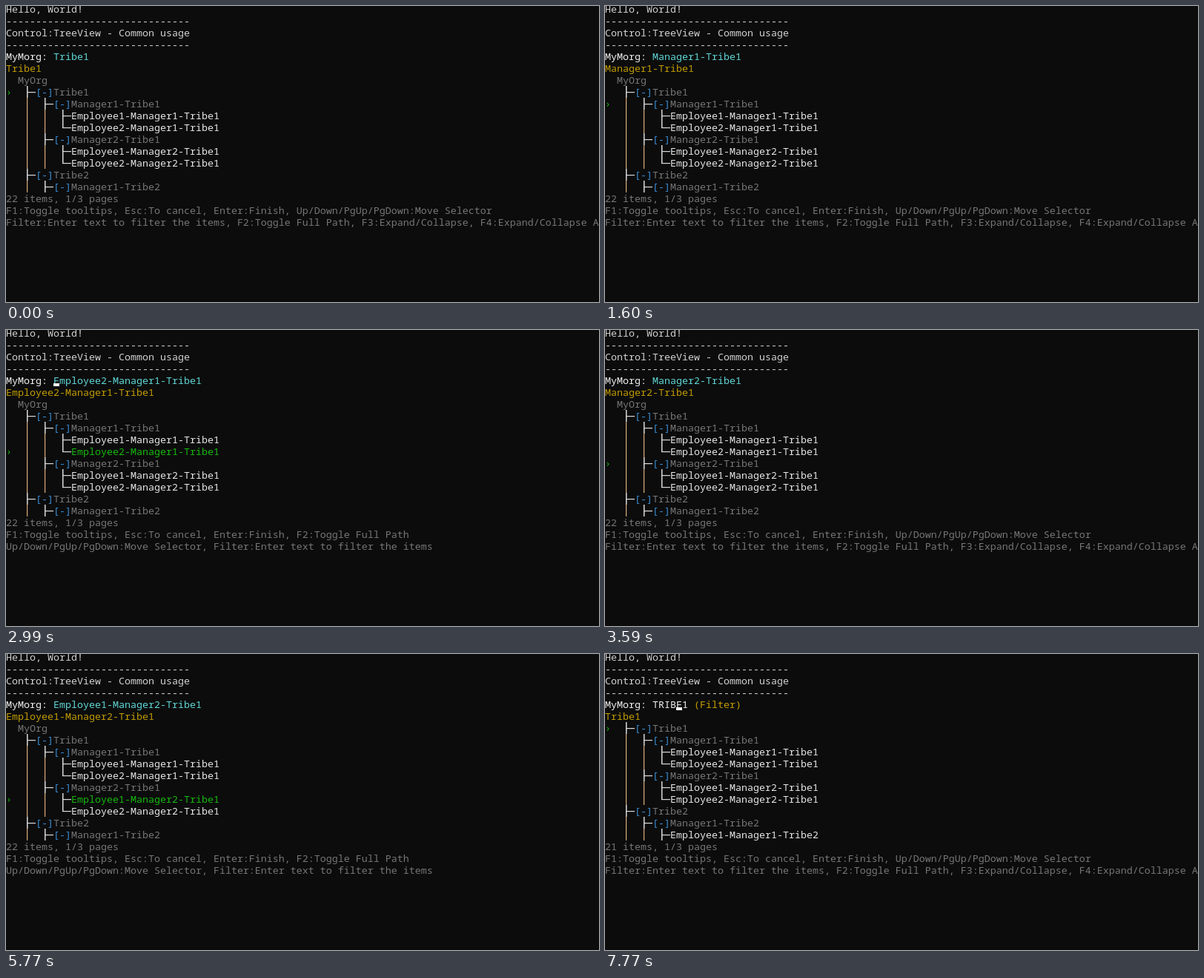
An HTML page for the animation above (8 s loop, 800x400 px).

```html
<!DOCTYPE html>
<html lang="en">
<head>
<meta charset="utf-8">
<title>TreeView</title>
<style>
  html, body { margin: 0; width: 100%; height: 100%; overflow: hidden; background: #0c0c0c; }
  svg { display: block; width: 800px; height: 400px; }
  text { font: 13.333px "Noto Sans Mono", "DejaVu Sans Mono", monospace; white-space: pre; }
</style>
</head>
<body>
<svg viewBox="0 0 800 400">
  <g id="screen"></g>
  <rect id="caret" y="72" width="8" height="4" fill="#f2f2f2"/>
  <path id="mouse" d="M0 0V16.5L3.8 13L6.3 18.6L8.9 17.4L6.5 12H11.6Z" fill="#fff" stroke="#000" stroke-width=".8"/>
</svg>
<script>
const LOOP = 8000, CELL = 8, ROW = 16, PAGE = 10, LIST_ROW = 6;
const C = {
  text: '#d2d2d2', bright: '#f2f2f2', leaf: '#e6e6e6', grey: '#767676', cyan: '#61d6d6',
  yellow: '#c19c00', green: '#16b80e', blue: '#3a8fd6', line: '#d8d8d8', stem: '#d9ac7c'
};

// Each step: start time, selected item, caret visible, filter text
const STEPS = [
  [0, 1, 0], [200, 1, 1], [790, 1, 0],
  [1010, 2, 1], [1600, 2, 0],
  [2000, 3, 1], [2590, 3, 0],
  [2790, 4, 1],
  [3190, 5, 1], [3590, 5, 0], [4180, 5, 1], [4780, 5, 0],
  [5180, 6, 1], [5770, 6, 0], [6170, 6, 1],
  [6370, 7, 1],
  [6760, 1, 1, 'TRIBE1'], [7370, 1, 0, 'TRIBE1'], [7770, 1, 1, 'TRIBE1']
];
const MOUSE = [[0], [400, 351, 184], [590, 367, 158], [1010]];

const HELP = 'F1:Toggle tooltips, Esc:To cancel, Enter:Finish, ';
const MOVE = 'Up/Down/PgUp/PgDown:Move Selector';
const FILTER = 'Filter:Enter text to filter the items';
const PATH = 'F2:Toggle Full Path';

const items = [{ name: 'MyOrg', depth: -1 }];
for (let t = 1; t <= 3; t++) {
  items.push({ name: `Tribe${t}`, depth: 0 });
  for (let m = 1; m <= 2; m++) {
    const manager = `Manager${m}-Tribe${t}`;
    items.push({ name: manager, depth: 1 });
    for (let e = 1; e <= 2; e++)
      items.push({ name: `Employee${e}-${manager}`, depth: 2, last: e === 2 });
  }
}

const put = (col, row, str, color) =>
  `<text x="${col * CELL}" y="${row * ROW + 9}" fill="${color}">${str}</text>`;
const box = (x, y, w, h, color) =>
  `<rect x="${x}" y="${y}" width="${w}" height="${h}" fill="${color}"/>`;

function branch(item, row) {
  const top = row * ROW - 4;
  let out = '';
  for (let d = 0; d < item.depth; d++)
    out += box((3 + 3 * d) * CELL + 4, top, 1.2, ROW, C.stem);
  const x = (3 + 3 * item.depth) * CELL + 4;
  return out + box(x, top, 1.5, item.last ? 9 : ROW, C.line) + box(x, top + 8, 12, 1.2, C.line);
}

function node(item, row, selected) {
  const arrow = selected ? put(0, row, '›', C.green) : '';
  if (item.depth < 0) return arrow + put(2, row, item.name, C.grey);
  const col = 5 + 3 * item.depth, leaf = item.depth === 2;
  const label = leaf
    ? put(col, row, item.name, selected ? C.green : C.leaf)
    : put(col, row, '[-]', C.blue) + put(col + 3, row, item.name, C.grey);
  return arrow + branch(item, row) + label;
}

function draw(sel, filter) {
  const current = items[sel], rule = '-'.repeat(31);
  const first = filter ? 1 : 0;
  let out = put(0, 0, 'Hello, World!', C.text) + put(0, 1, rule, C.text) +
    put(0, 2, 'Control:TreeView - Common usage', C.text) + put(0, 3, rule, C.text) +
    put(0, 4, 'MyMorg:', C.bright);
  out += filter
    ? put(8, 4, filter, C.bright) + put(15, 4, '(Filter)', C.yellow)
    : put(8, 4, current.name, C.cyan);
  out += put(0, 5, current.name, C.yellow);
  items.slice(first, first + PAGE).forEach((item, i) => {
    out += node(item, LIST_ROW + i, item === current);
  });
  const tips = current.depth === 2
    ? [HELP + PATH, `${MOVE}, ${FILTER}`]
    : [HELP + MOVE, `${FILTER}, ${PATH}, F3:Expand/Collapse, F4:Expand/Collapse All`];
  return out + put(0, 16, `${items.length - first} items, 1/3 pages`, C.grey) +
    put(0, 17, tips[0], C.grey) + put(0, 18, tips[1], C.grey);
}

const [screenEl, caretEl, mouseEl] = ['screen', 'caret', 'mouse'].map(id => document.getElementById(id));
const at = (table, t) => table.findLast(step => step[0] <= t);
const show = (el, on) => el.setAttribute('visibility', on ? 'visible' : 'hidden');
let shown = '';

function render(t) {
  const [, sel, caret, filter = ''] = at(STEPS, t);
  const key = sel + filter;
  if (key !== shown) {
    shown = key;
    screenEl.innerHTML = draw(sel, filter);
  }
  caretEl.setAttribute('x', (filter ? 12 : 8) * CELL);
  show(caretEl, caret);
  const [, x, y] = at(MOUSE, t);
  show(mouseEl, x);
  if (x) mouseEl.setAttribute('transform', `translate(${x} ${y})`);
}

const start = performance.now();
function tick() {
  render((performance.now() - start) % LOOP);
  requestAnimationFrame(tick);
}
tick();
</script>
</body>
</html>
```
